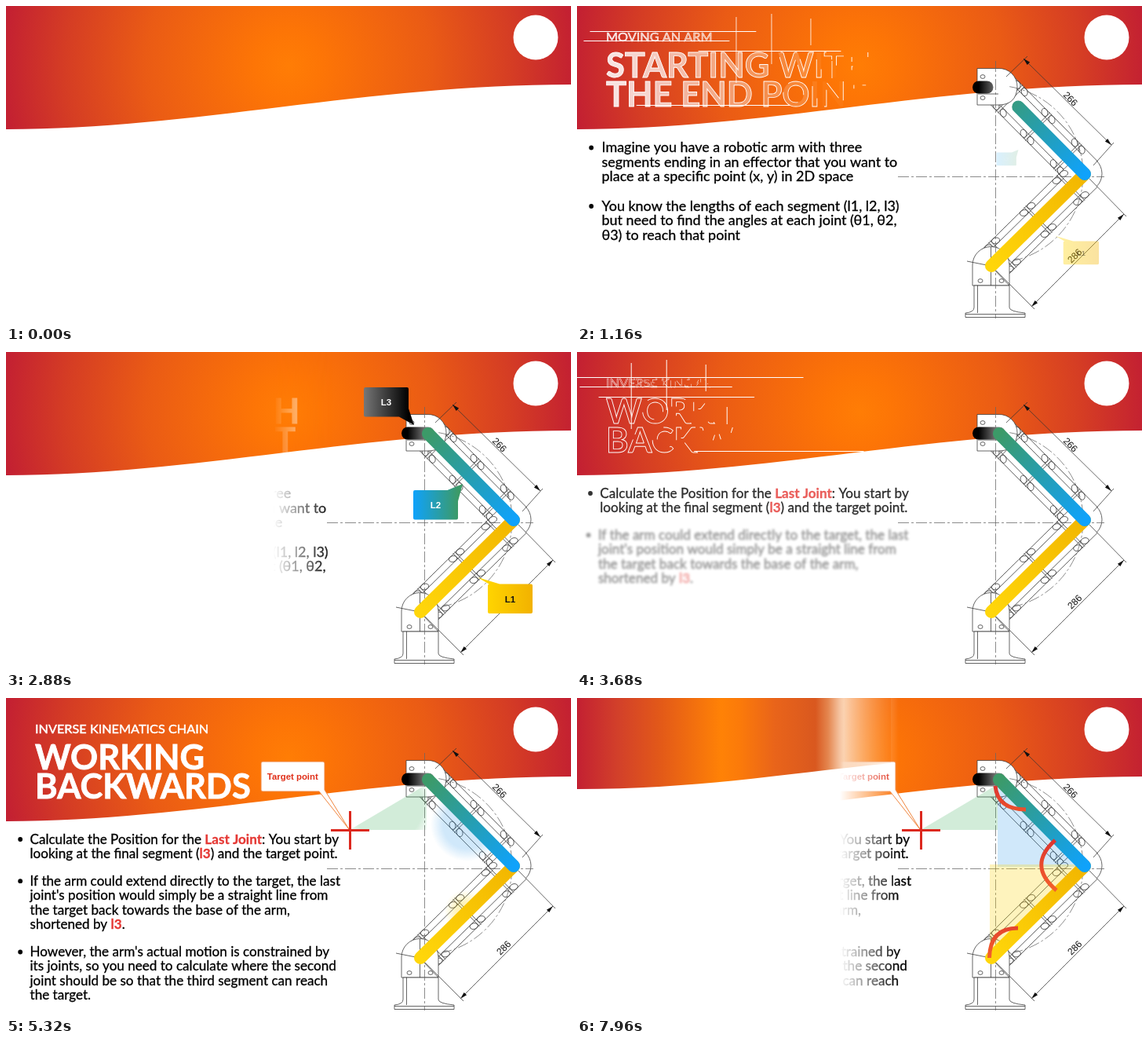
Animation, 720 px wide and 405 px high, one loop 8000 ms. Source, as an HTML page with a canvas:

```html
<!DOCTYPE html>
<html lang="en">
<head>
<meta charset="utf-8">
<title>Arm lesson</title>
<style>
  html, body { margin: 0; width: 100%; height: 100%; overflow: hidden; background: #fff; }
  canvas { display: block; width: 100vw; height: 100vh; }
</style>
</head>
<body>
<canvas id="stage" width="720" height="405"></canvas>
<script>
const W = 720, H = 405, LOOP = 8000;
const SLIDE2 = 3220, WIPE = 700;
const LATO = 'Lato, Carlito, sans-serif', ARIAL = '"Liberation Sans", Arial, sans-serif';
const BASE = [528, 331], ELBOW = [647, 214], WRIST = [538, 104];

let g = document.getElementById('stage').getContext('2d');
const layers = [];
let depth = 0;

const clamp = v => Math.min(1, Math.max(0, v));
const ramp = (t, start, duration) => clamp((t - start) / duration);
const mix = (a, b, p) => a + (b - a) * p;
const easeOut = p => 1 - (1 - p) ** 3.4;

function stops(gradient, ...list) {
  list.forEach(([at, color]) => gradient.addColorStop(at, color));
  return gradient;
}
const linear = (x0, y0, x1, y1, ...list) => stops(g.createLinearGradient(x0, y0, x1, y1), ...list);
const radial = (x, y, r, ...list) => stops(g.createRadialGradient(x, y, 0, x, y, r), ...list);

// Draws on a separate layer, keeps only what the mask paint covers.
function masked(draw, maskPaint) {
  const outer = g;
  if (!layers[depth]) {
    const canvas = document.createElement('canvas');
    canvas.width = W;
    canvas.height = H;
    layers[depth] = canvas.getContext('2d');
  }
  g = layers[depth++];
  g.clearRect(0, 0, W, H);
  g.save();
  draw();
  g.globalCompositeOperation = 'destination-in';
  g.fillStyle = maskPaint();
  g.fillRect(0, 0, W, H);
  g.restore();
  const layer = g.canvas;
  depth--;
  g = outer;
  g.drawImage(layer, 0, 0);
}

function line(...points) {
  g.beginPath();
  points.forEach(([x, y]) => g.lineTo(x, y));
  g.stroke();
}
function circle(x, y, r, color) {
  g.fillStyle = color;
  g.beginPath();
  g.arc(x, y, r, 0, 7);
  g.fill();
}

function background() {
  g.fillStyle = '#fff';
  g.fillRect(0, 0, W, H);
  g.fillStyle = radial(360, 76, 365, [0, '#ff7d05'], [.12, '#fd7506'], [.5, '#ea5b15'], [.78, '#d53d24'], [1, '#c32032']);
  g.fill(new Path2D('M0 0V157C240 157 457 100 720 100V0Z'));
  circle(675, 40, 28.5, '#fff');
}

// --- titles -------------------------------------------------------------

function sketchText(text, y, size, weight, outline, p) {
  g.font = `${weight} ${size}px ${LATO}`;
  g.lineWidth = outline;
  [...text].forEach((ch, i) => {
    const offset = g.measureText(text.slice(0, i + 1)).width - g.measureText(ch).width;
    const drawn = clamp(5 * p - .009 * offset);
    if (!drawn) return;
    const period = size * 1.5;
    g.setLineDash(drawn < 1 ? [drawn * period, (1 - drawn) * period] : []);
    g.strokeText(ch, 37 + offset, y);
    g.globalAlpha = clamp(3.2 * p - .95 - .003 * offset);
    g.fillText(ch, 37 + offset, y);
    g.globalAlpha = 1;
  });
  g.setLineDash([]);
}

function title(small, first, second, p) {
  if (p <= 0) return;
  g.save();
  g.fillStyle = g.strokeStyle = '#fff';
  sketchText(small, 45, 16.25, 400, .5, p);
  sketchText(first, 90.5, 43.5, 700, .9, p);
  sketchText(second, 127.5, 43.5, 700, .9, p);

  // Construction lines that slide along the lettering.
  g.lineWidth = 1;
  g.globalAlpha = clamp(p * 12) * clamp((1 - p) * 10);
  [[32.5, -40, 330, 60, 150], [44.5, 0, 200, 15, 190], [57.5, -60, 150, 320, 480], [126.5, 200, 430, -20, 150]]
    .forEach(([y, a0, b0, a1, b1]) => line([mix(a0, a1, p), y], [mix(b0, b1, p), y]));
  g.globalAlpha *= clamp((.7 - p) * 6);
  [[-60, 14, 98], [-15, 10, 74], [35, 16, 50], [62, 70, 92]]
    .forEach(([dx, y0, y1]) => line([37 + p * 400 + dx, y0], [37 + p * 400 + dx, y1]));
  g.restore();
}

// --- body text: *marked* words are bold and red ---------------------------

function bullet(x, y, step, size, lines, p) {
  if (p <= 0) return;
  g.save();
  g.globalAlpha = p;
  if (p < 1) g.filter = `blur(${(1 - p) * 3}px)`;
  g.translate(-6 * (1 - p), 0);
  g.lineWidth = .3;
  circle(18.2, y - 5.5, 2.9, '#000');
  lines.forEach((text, row) => {
    let cursor = x;
    text.split('*').forEach((part, i) => {
      g.font = `${i % 2 ? 700 : 400} ${size}px ${LATO}`;
      g.fillStyle = g.strokeStyle = i % 2 ? '#e53935' : '#000';
      g.fillText(part, cursor, y + row * step);
      g.strokeText(part, cursor, y + row * step);
      cursor += g.measureText(part).width;
    });
  });
  g.restore();
}

// --- technical drawing ----------------------------------------------------

function drawnSegment([x0, y0], [x1, y1], flanges) {
  const length = Math.hypot(x1 - x0, y1 - y0);
  g.save();
  g.translate(x0, y0);
  g.rotate(Math.atan2(y1 - y0, x1 - x0));
  g.fillRect(0, -23, length, 46);
  line([0, -23], [length, -23]);
  line([0, 23], [length, 23]);
  line([14, -15], [length - 22, -15]);
  line([14, 15], [length - 22, 15]);
  for (const at of flanges) {
    const u = at * length;
    for (const d of [-1.5, 1.5]) line([u + d, -24], [u + d, 24]);
    for (const v of [-19, 19]) for (const d of [-6.5, 6.5]) {
      g.beginPath();
      g.ellipse(u + d, v, 5.2, 3.8, .5, 0, 7);
      g.stroke();
    }
  }
  g.restore();
}

function dimension(a, b, label, x, y, angle) {
  line(a, b);
  const dir = Math.atan2(b[1] - a[1], b[0] - a[0]);
  [[a, dir], [b, dir + Math.PI]].forEach(([[px, py], turn]) => {
    g.save();
    g.translate(px, py);
    g.rotate(turn);
    g.fillStyle = '#111';
    g.fill(new Path2D('M0 0L9 -2.4V2.4Z'));
    g.restore();
  });
  g.save();
  g.translate(x, y);
  g.rotate(angle);
  g.font = `12px ${ARIAL}`;
  g.textAlign = 'center';
  g.fillStyle = '#111';
  g.fillText(label, 0, 4.3);
  g.restore();
}

function drawing() {
  g.save();
  g.strokeStyle = '#333';
  g.lineWidth = .75;
  g.fillStyle = '#fff';

  drawnSegment(WRIST, ELBOW, [.13, .45, .8]);
  drawnSegment(BASE, ELBOW, [.12, .5, .85]);
  g.beginPath();
  g.arc(646, 213.5, 23, -.8, .8);
  g.fill();
  g.stroke();

  const outlines = [
    'M510 79.5H537A23 23 0 0 1 561 103Q560 126 537 126H510Z',
    'M504 356V330A23.5 23.5 0 0 1 551 330V356Z',
    'M506 356V384Q506 390 495 391V396.5H571V391Q551 389 551 384V356Z'
  ].map(d => new Path2D(d));
  outlines.forEach(shape => { g.fill(shape); g.stroke(shape); });
  line([495, 392.5], [571, 392.5]);
  line([510.5, 356], [510.5, 391]);
  line([527.5, 307], [527.5, 356]);
  line([511, 112], [537, 112]);
  line([497, 325], [527, 331], [551, 356]);
  [[514, 350], [541, 350], [517, 90], [517, 117]].forEach(([x, y]) => {
    g.beginPath();
    g.ellipse(x, y, 3, 2.4, 0, 0, 7);
    g.stroke();
  });

  // Extension lines of the two dimensions
  line([547, 90], [574, 64]);
  line([658, 203], [684, 174]);
  line([653, 220], [700, 268]);
  line([531, 334], [583, 386]);
  dimension([569, 67], [681, 177], '266', 629, 118, Math.PI / 4);
  dimension([697, 265], [579, 383], '286', 634, 318, -Math.PI / 4);

  g.strokeStyle = '#666';
  g.setLineDash([14, 3, 3, 3]);
  line([533.5, 70], [533.5, 398]);
  line([409, 217.5], [672, 217.5]);
  g.beginPath();
  g.arc(532, 214, 113, -1.4, 1.35);
  g.stroke();
  g.restore();
}

function bar([x0, y0], [x1, y1], from, to, p) {
  if (p <= 0) return;
  g.lineWidth = 16;
  g.lineCap = 'round';
  g.strokeStyle = linear(x0, y0, x1, y1, [0, from], [1, to]);
  line([x0, y0], [mix(x0, x1, p), mix(y0, y1, p)]);
  g.lineCap = 'butt';
}

function bars(p1, p2, p3) {
  bar([512, 103.5], [538, 103.5], '#000', '#8a8a8a', p3);
  bar(BASE, ELBOW, '#ffd60a', '#f2b600', p1);
  bar(ELBOW, WRIST, '#0fa2fb', '#3c9a68', p2);
}

// --- callouts and marks -----------------------------------------------------

// Fades in while growing from the middle (cx, cy).
function zoom(cx, cy, p, draw) {
  if (p <= 0) return;
  const scale = easeOut(p);
  g.save();
  g.translate(cx, cy);
  g.scale(scale, scale);
  g.translate(-cx, -cy);
  g.globalAlpha = p;
  draw();
  g.restore();
}

function label(text, x, y, size, color) {
  g.font = `700 ${size}px ${ARIAL}`;
  g.textAlign = 'center';
  g.fillStyle = color;
  g.fillText(text, x, y);
  g.textAlign = 'left';
}

function tag(text, x, y, tail, from, to, color, p) {
  zoom(x + 28, y + 19, p, () => {
    const shape = new Path2D(tail);
    shape.roundRect(x, y, 57, 37.5, 2);
    g.fillStyle = linear(x, 0, x + 57, 0, [0, from], [1, to]);
    g.fill(shape);
    label(text, x + 28.5, y + 23, 11.5, color);
  });
}

function targetCallout(p) {
  zoom(382, 124.5, p, () => {
    g.fillStyle = '#fff';
    g.strokeStyle = '#f0843c';
    g.lineWidth = 1;
    const shape = new Path2D('M327 81H404Q406 81 406 83V117L437 167L399 119H327Q325 119 325 117V83Q325 81 327 81Z');
    g.fill(shape);
    g.stroke(shape);
    label('Target point', 365.3, 103.5, 11.4, '#e0301a');
  });
}

function cross(p) {
  const reach = 24.5 * easeOut(p);
  g.fillStyle = '#dc281e';
  g.fillRect(438.5 - reach, 167, 2 * reach, 3);
  g.fillRect(437, 168.5 - reach, 3, 2 * reach);
}

function triangle(path, color, cx, cy, radius, p) {
  if (p <= 0) return;
  const paint = () => { g.fillStyle = color; g.fill(new Path2D(path)); };
  if (p === 1) return paint();
  const r = p * (radius + 16);
  masked(paint, () => radial(cx, cy, r, [0, '#000'], [Math.max(0, 1 - 16 / r), '#000'], [1, 'transparent']));
}

function angleMark(path, length, y0, y1, p) {
  if (p <= 0) return;
  g.save();
  g.lineWidth = 5;
  g.strokeStyle = linear(0, y0, 0, y1, [0, '#dc3430'], [1, '#f4602a']);
  g.setLineDash([length * p, 200]);
  g.stroke(new Path2D(path));
  g.restore();
}

// --- slides -------------------------------------------------------------------

function slide1(t) {
  background();
  title('MOVING AN ARM', 'STARTING WITH', 'THE END POINT', ramp(t, 20, 2020));
  bullet(31.5, 186, 18.7, 17.95, [
    'Imagine you have a robotic arm with three',
    'segments ending in an effector that you want to',
    'place at a specific point (x, y) in 2D space'
  ], ramp(t, 100, 450));
  bullet(31.5, 260.5, 18.7, 17.95, [
    'You know the lengths of each segment (l1, l2, l3)',
    'but need to find the angles at each joint (θ1, θ2,',
    'θ3) to reach that point'
  ], ramp(t, 280, 450));

  const reveal = ramp(t, 100, 700);
  if (reveal === 1) drawing();
  else if (reveal > 0) {
    const half = reveal * 200, edge = Math.min(.5, 15 / half);
    masked(drawing, () => linear(0, 233 - half, 0, 233 + half,
      [0, 'transparent'], [edge, '#000'], [1 - edge, '#000'], [1, 'transparent']));
  }
  bars(ramp(t, 700, 400), ramp(t, 850, 400), ramp(t, 1000, 400));
  tag('L1', 614, 295.5, 'M601 287L634 297H618Z', '#ffd400', '#f2b200', '#111', ramp(t, 900, 700));
  tag('L2', 519, 176, 'M582 168L576 190L560 177Z', '#0fa2fb', '#3c9a68', '#fff', ramp(t, 1050, 700));
  tag('L3', 456, 45, 'M520 93L500 82L513 72Z', '#777', '#000', '#fff', ramp(t, 1180, 700));
}

function slide2(t) {
  const s = t - SLIDE2;
  background();
  title('INVERSE KINEMATICS CHAIN', 'WORKING', 'BACKWARDS', ramp(s, 0, 2000));
  [
    [185.5, ['Calculate the Position for the *Last Joint*: You start by',
      'looking at the final segment (*l3*) and the target point.']],
    [238.7, ['If the arm could extend directly to the target, the last',
      "joint's position would simply be a straight line from",
      'the target back towards the base of the arm,', 'shortened by *l3*.']],
    [329, ["However, the arm's actual motion is constrained by",
      'its joints, so you need to calculate where the second',
      'joint should be so that the third segment can reach', 'the target.']]
  ].forEach(([y, lines], i) => bullet(30.5, y, 18.45, 17.1, lines, ramp(s, 100 + 180 * i, 450)));

  drawing();
  triangle('M438 168L536 110V168Z', 'rgba(52,168,83,.22)', 487, 139, 57, ramp(t, 4780, 660));
  triangle('M536 106L645 215H536Z', 'rgba(20,140,230,.2)', 588, 161, 75, ramp(t, 4980, 660));
  triangle('M526 212H647L526 331Z', 'rgba(250,210,20,.28)', 586, 272, 85, ramp(t, 5140, 660));
  bars(1, 1, 1);
  targetCallout(ramp(t, 4045, 700));
  cross(ramp(t, 4125, 700));
  angleMark('M533 112Q536 142 572 142', 60, 112, 160, ramp(t, 5930, 500));
  angleMark('M525.5 331Q526 293 562 293', 62, 270, 331, ramp(t, 6280, 560));
  angleMark('M611 245Q573 213 610 180.5', 76, 180, 245, ramp(t, 6600, 520));
}

function slide3() {
  g.fillStyle = '#fff';
  g.fillRect(0, 0, W, H);
  g.fillStyle = linear(0, 0, 400, 0, [0, '#c32032'], [.13, '#d2402a'], [.27, '#e35a18'], [.46, '#ff8206'],
    [.52, '#fb7a0a'], [.63, '#e9641a'], [.76, '#d9581f'], [.8, '#e4864f'], [.85, '#fbd9bd'], [1, '#f8b27c']);
  g.fill(new Path2D('M0 0V116C150 116 250 98 400 83V0Z'));
  circle(675, 40, 28.5, '#fff');
}

function wipeTo(slide, p) {
  const lead = p * (W + 75);
  masked(slide, () => linear(lead - 75, 0, lead, 0, [0, '#000'], [1, 'transparent']));
}

function frame() {
  const t = performance.now() % LOOP;
  if (t < SLIDE2) slide1(t);
  else slide2(t);
  if (t > 2515 && t < SLIDE2) wipeTo(() => slide2(t), ramp(t, 2515, WIPE));
  if (t > 7600) wipeTo(slide3, ramp(t, 7600, WIPE));
  requestAnimationFrame(frame);
}
frame();
</script>
</body>
</html>
```
